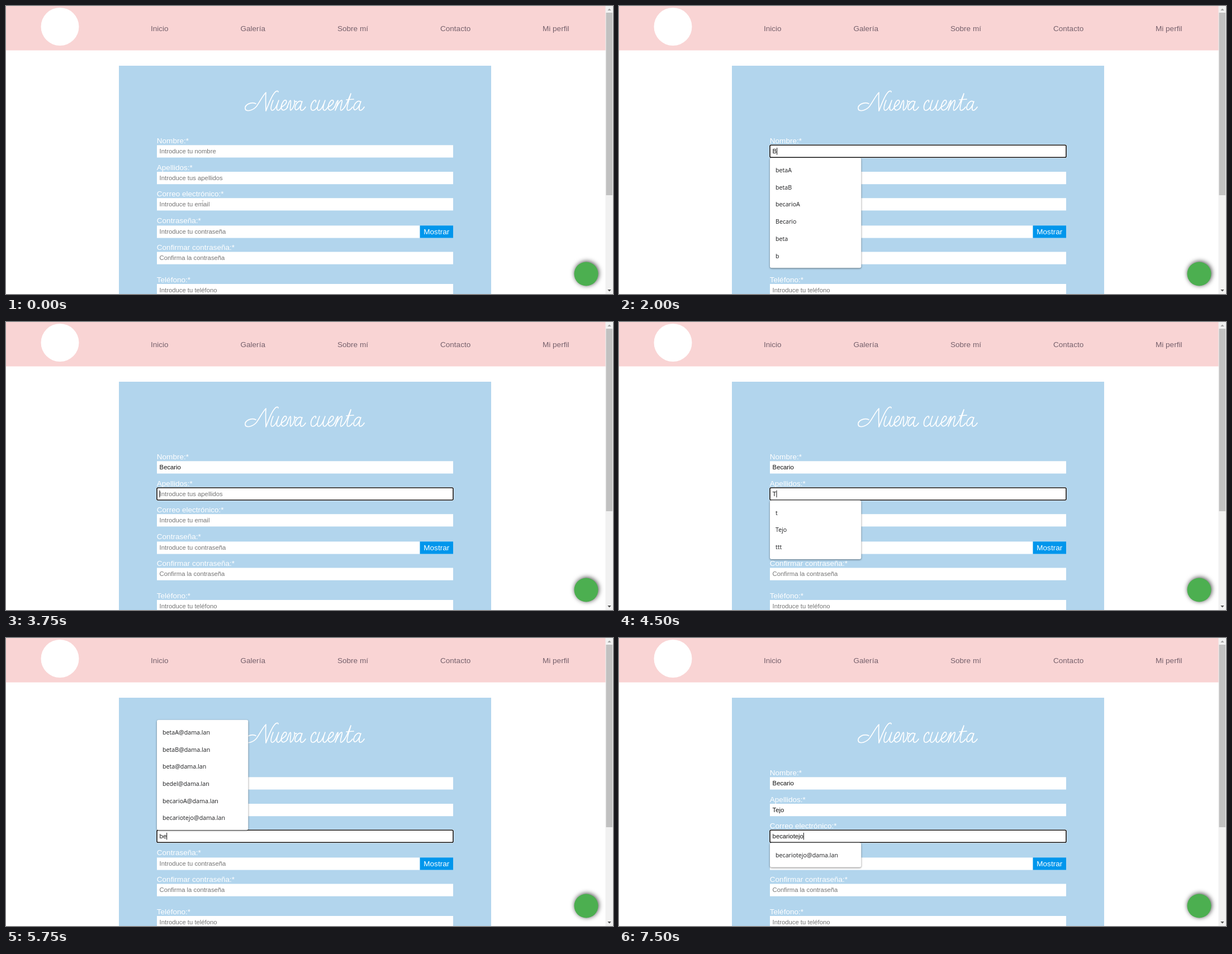
Write an HTML page that moves like this. It is 1086x516 px and loops after 8 s.

```html
<!DOCTYPE html>
<html lang="es">
<head>
<meta charset="utf-8">
<title>Nueva cuenta</title>
<style>
  html, body { margin: 0; width: 100%; height: 100%; overflow: hidden; background: #fff; }
  svg { display: block; width: 1086px; height: 516px; }
  text { font-family: "Liberation Sans", Arial, sans-serif; font-size: 13.55px; white-space: pre; }
  .nav text { fill: #76616c; }
  .label, .show { fill: #fff; }
  .value { font-size: 11.3px; fill: #111; }
  .value.hint { fill: #757575; }
  .title-text { fill: transparent; font-size: 36px; }
  .script { fill: none; stroke: #fff; stroke-width: 1.7; stroke-linecap: round; stroke-linejoin: round; }
  .ring { fill: none; }
  .popup rect { fill: #fff; filter: drop-shadow(0 1px 1.5px rgba(0, 0, 0, .5)); }
  .popup text { font: 500 10.7px "Open Sans", "Noto Sans", sans-serif; fill: #1d1e20; }
  .chat { fill: #4caf50; filter: drop-shadow(1px -1px 4px rgba(0, 0, 0, .75)); }
  .beam { fill: none; stroke: #b5b5b5; stroke-width: .7; }
  .arrow { fill: #fff; stroke: #333; stroke-width: .6; }
</style>
</head>
<body>
<svg viewBox="0 0 1086 516">
  <rect width="1073" height="79.5" fill="#f9d4d4"/>
  <circle cx="96.5" cy="37" r="34" fill="#fff"/>
  <g class="nav">
    <text x="259" y="44.5">Inicio</text>
    <text x="419.5" y="44.5">Galería</text>
    <text x="593" y="44.5">Sobre mí</text>
    <text x="777" y="44.5">Contacto</text>
    <text x="960" y="44.5">Mi perfil</text>
  </g>
  <rect x="202" y="107" width="666" height="409" fill="#b2d5ed"/>
  <text class="title-text" x="428" y="187">Nueva cuenta</text>
  <g id="script" class="script"></g>
  <g id="form"></g>
  <rect x="740.5" y="393.3" width="59.5" height="22.3" fill="#0096ec"/>
  <text class="show" x="747.3" y="409">Mostrar</text>
  <g id="ring" class="ring">
    <rect x="270" width="530" height="22" rx="2" stroke="#fff" stroke-width="2.6"/>
    <rect x="270" width="530" height="22" rx="2" stroke="#101010" stroke-width="1.6"/>
  </g>
  <rect id="caret" width="1" height="12.5" fill="#111"/>
  <g id="popup" class="popup"></g>
  <path id="beam" class="beam" d="M-1.5-5H1.5M0-5V5M-1.5 5H1.5"/>
  <path id="arrow" class="arrow" d="M428.5 284.5v9l2-1.8 1.5 3 1.3-.7-1.4-2.8h3z"/>
  <circle class="chat" cx="1038" cy="480" r="21.5"/>
  <rect x="1072.5" width="13.5" height="516" fill="#f1f1f1"/>
  <rect x="1073.5" y="12" width="11.5" height="327" fill="#c1c1c1"/>
  <path d="M1076.3 8h6.4l-3.2-3.4z" fill="#a3a3a3"/>
  <path d="M1076.3 508h6.4l-3.2 3.4z" fill="#505050"/>
</svg>
<script>
const LOOP = 8000, LEFT = 274.6;
const $ = id => document.getElementById(id);

function add(parent, tag, attrs, text) {
  const node = document.createElementNS('http://www.w3.org/2000/svg', tag);
  for (const key in attrs) node.setAttribute(key, attrs[key]);
  if (text) node.textContent = text;
  parent.append(node);
  return node;
}

// Handwritten letters, each drawn from its baseline
const glyphs = {
  N: 'M20-12C11-16 0-10 1-3C2 3 14 1 21-7C27-15 32-26 38-32C37-20 38-7 38 1C43-11 47-24 53-31C56-35 60-36 60-33',
  u: 'M4-18C1-11-2-1 2 0C7 0 11-9 14-18C11-10 8 0 13 0C15 0 17-3 19-6',
  e: 'M0-6C6-8 12-14 9-18C5-20-1-9 1-3C3 2 9-1 12-6',
  v: 'M0-6C3-12 4-18 6-18C8-16 4-2 6 0C10-2 15-12 13-18C13-16 15-15 17-16',
  a: 'M12-15C9-20 1-13 0-5C0 3 8-1 13-16C10-8 8 0 12 0C15 0 17-3 19-6',
  c: 'M9-15C11-19 7-20 3-14C-1-7 0 0 4 0C8 0 10-3 12-6',
  n: 'M0-6C2-10 4-18 6-18C7-16 3-6 1 0C4-8 10-19 13-18C15-16 8-2 11 0C14 0 16-3 18-6',
  t: 'M0-6C4-12 7-20 11-30C8-20 1 0 6 0C9 0 12-3 14-6M3-19L16-20'
};
const places = [427, 474, 492, 503, 517, 545, 557, 576, 588, 606, 622];
[...'Nuevacuenta'].forEach((letter, i) =>
  add($('script'), 'path', { d: glyphs[letter], transform: `translate(${places[i]} 187)` }));

// Label, hint, label baseline, box top
const fields = [
  ['Nombre:*', 'Introduce tu nombre', 245.8, 249.3],
  ['Apellidos:*', 'Introduce tus apellidos', 293.5, 297],
  ['Correo electrónico:*', 'Introduce tu email', 340.8, 344.2],
  ['Contraseña:*', 'Introduce tu contraseña', 388.5, 393.4],
  ['Confirmar contraseña:*', 'Confirma la contraseña', 437, 440.5],
  ['Teléfono:*', 'Introduce tu teléfono', 494.6, 498]
].map(([label, hint, base, top]) => {
  add($('form'), 'text', { class: 'label', x: 269.8, y: base }, label);
  add($('form'), 'rect', { x: 270, y: top, width: 530, height: 22.2, fill: '#fff' });
  return { hint, top, node: add($('form'), 'text', { x: LEFT, y: top + 14.9 }) };
});

const mail = name => name + '@dama.lan';
const five = ['betaA', 'betaB', 'becarioA', 'Becario', 'beta'];
const two = ['becarioA', 'Becario'];
const mails = ['becarioA', 'becariotejo'].map(mail);

// Time, field, value, suggestions, caret hidden
const steps = [
  [1000, 0, '', ['1', 'dueño', 'betaA', 'aaa', 'aa', 'betaB']],
  [1500, 0, '', ['1', 'dueño', 'betaA', 'aaa', 'aa', 'betaB'], true],
  [2000, 0, 'B', [...five, 'b']],
  [2500, 0, 'Be', five],
  [3000, 0, 'Bec', two],
  [3250, 0, 'Becar', two],
  [3500, 0, 'Becario', two],
  [3750, 1, '', []],
  [4250, 1, '', [], true],
  [4500, 1, 'T', ['t', 'Tejo', 'ttt']],
  [4750, 1, 'Te', ['Tejo']],
  [5000, 1, 'Tejo', []],
  [5250, 2, '', []],
  [5750, 2, 'be', [...['betaA', 'betaB', 'beta', 'bedel'].map(mail), ...mails]],
  [6000, 2, 'beca', mails],
  [6250, 2, 'becar', mails],
  [6500, 2, 'becario', mails],
  [6750, 2, 'becariot', [mails[1]]],
  [7000, 2, 'becariotej', [mails[1]]],
  [7500, 2, 'becariotejo', [mails[1]]]
];

function drawPopup(top, items) {
  const popup = $('popup');
  popup.replaceChildren();
  if (!items.length) return;
  const height = 13.2 + 30.7 * items.length;
  // Open upwards when there is no room below
  let y = top + 22.6;
  if (y + height > 516) y = top - height;
  add(popup, 'rect', { x: 270, y, width: 163.3, height, rx: 3 });
  items.forEach((item, i) => add(popup, 'text', { x: 280, y: y + 26.1 + 30.7 * i }, item));
}

function show(id, on) { $(id).style.display = on ? '' : 'none'; }

function render(count) {
  const values = fields.map(() => '');
  steps.slice(0, count).forEach(([, field, value]) => values[field] = value);
  fields.forEach(({ node, hint }, i) => {
    node.textContent = values[i] || hint;
    node.setAttribute('class', values[i] ? 'value' : 'value hint');
  });
  show('ring', count);
  show('caret', count && !steps[count - 1][4]);
  if (!count) return drawPopup(0, []);
  const [, field, value, items] = steps[count - 1];
  const { top, node } = fields[field];
  $('ring').setAttribute('transform', `translate(0 ${top})`);
  $('caret').setAttribute('x', LEFT + (value ? node.getComputedTextLength() : -.2));
  $('caret').setAttribute('y', top + 4.7);
  drawPopup(top, items);
}

const start = performance.now();
let last = -1;
function tick() {
  const t = (performance.now() - start) % LOOP;
  const count = steps.filter(step => step[0] <= t).length;
  if (count !== last) render(last = count);
  show('beam', t < 500);
  show('arrow', t >= 500 && t < 750);
  $('beam').setAttribute('transform', t < 250 ? 'translate(352 353.5)' : 'translate(393.5 315)');
  requestAnimationFrame(tick);
}
tick();
</script>
</body>
</html>
```
